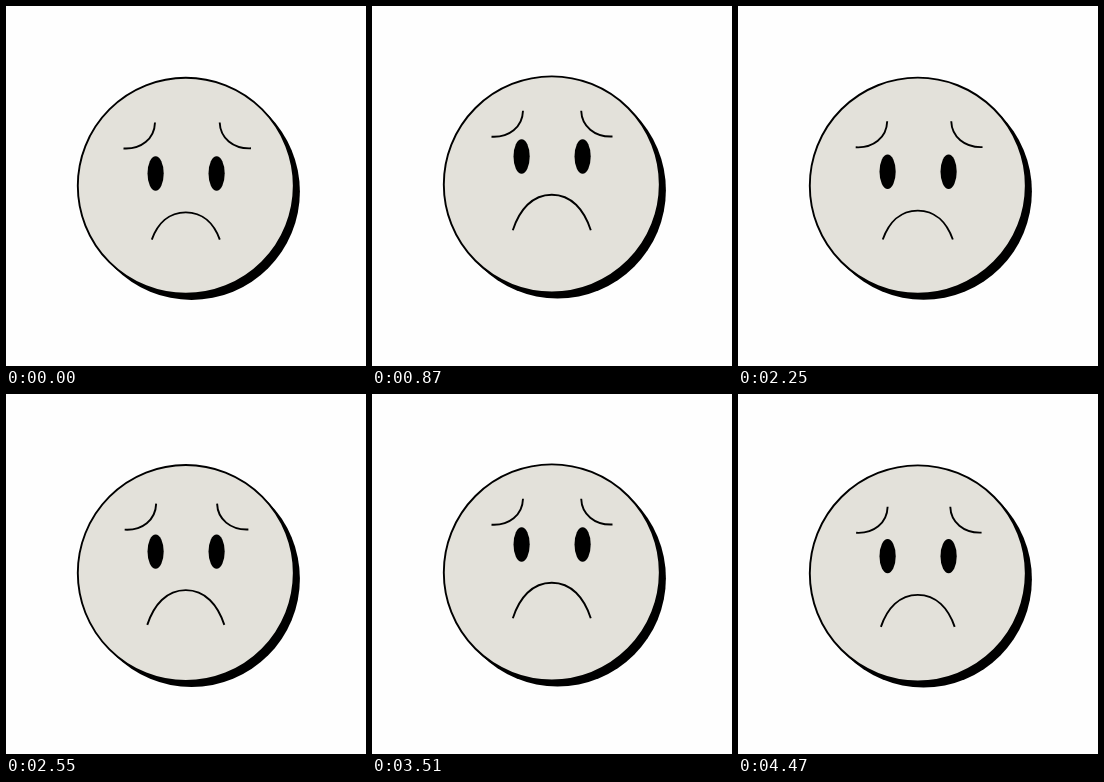
Write an HTML page that moves like this. It is 360x360 px and loops after 4.5 s.

```html
<!DOCTYPE html>
<html lang="en">
<head>
<meta charset="utf-8">
<title>Sad face</title>
<style>
html, body { margin: 0; width: 100%; height: 100%; overflow: hidden; background: #fefefe; }
svg { display: block; width: 100vw; height: 100vh; }
</style>
</head>
<body>
<svg viewBox="0 0 360 360">
  <g id="head">
    <circle cx="185.6" cy="185.6" r="108.3"/>
    <circle cx="179.8" cy="179.8" r="108" fill="#e3e1da" stroke="#000" stroke-width="1.9"/>
  </g>
  <g id="eyes">
    <ellipse cx="149.6" cy="167.5" rx="8.1" ry="17.2"/>
    <ellipse cx="210.6" cy="167.5" rx="8.1" ry="17.2"/>
  </g>
  <g fill="none" stroke="#000" stroke-width="1.9">
    <path id="browL" d="M117.5 142.5C135 143.5 148.5 133 149 116.5"/>
    <path id="browR" d="M213.7 116.5C214.2 132 227 143 245 142.3"/>
    <path id="mouth"/>
  </g>
</svg>
<script>
const LOOP = 4500, STEP = 30, CYCLE = 2070;
const $ = id => document.getElementById(id);

function ease(t, start, end) {
  const x = Math.min(1, Math.max(0, (t - start) / (end - start)));
  return (1 - Math.cos(Math.PI * x)) / 2;
}

// 0 at rest, 1 when raised
const swing = (t, up, down, rest) => ease(t, 0, up) - ease(t, down, rest);

function move(id, x, y) {
  $(id).setAttribute('transform', `translate(${x.toFixed(2)} ${y.toFixed(2)})`);
}

function mouthPath(top, w, h) {
  const cx = 179.8, end = top + h;
  return `M${cx - w} ${end}C${cx - w * .83} ${top + h * .42} ${cx - w * .5} ${top} ${cx} ${top}` +
    `S${cx + w * .83} ${top + h * .42} ${cx + w} ${end}`;
}

function draw(time) {
  const t = Math.floor(time % LOOP / STEP) * STEP % CYCLE;
  const lift = swing(t, 870, 1435, 1995);
  const frown = swing(t, 600, 1415, 1885);
  move('head', 0, -1.4 * lift);
  move('eyes', 0, -17 * lift);
  move('browL', 2 * lift, -11.8 * lift);
  move('browR', -4.5 * lift, -11.8 * lift);
  $('mouth').setAttribute('d', mouthPath(206.4 - 17.7 * lift, 34 + 5 * frown, 27.2 + 8.4 * frown));
}

let start;
function tick(now) {
  start ??= now;
  draw(now - start);
  requestAnimationFrame(tick);
}
draw(0);
requestAnimationFrame(tick);
</script>
</body>
</html>
```
